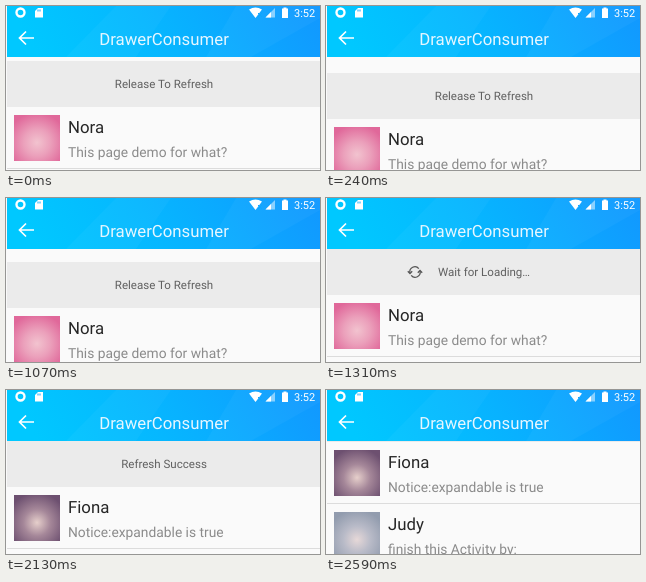
Write an HTML page that moves like this. It is 314x164 px and loops after 2690 ms.

```html
<!DOCTYPE html>
<html lang="en">
<head>
<meta charset="utf-8">
<title>Pull to refresh</title>
<style>
html, body { margin: 0; width: 100%; height: 100%; overflow: hidden; background: #fafafa; }
svg { display: block; width: 314px; height: 164px; }
text { font-family: Roboto, sans-serif; text-rendering: geometricPrecision; }
.name { font-size: 16.8px; fill: #262626; }
.note { font-size: 13.8px; fill: #8b8b8b; }
.label { font-size: 11.55px; fill: #606060; text-anchor: middle; }
.title { font-size: 16.8px; fill: #e6f6ff; text-anchor: middle; }
.clock { font-size: 11px; fill: #fff; }
</style>
</head>
<body>
<svg viewBox="0 0 314 164">
  <defs>
    <linearGradient id="sky" x2="1" y2="-.1">
      <stop stop-color="#00c8ff"/>
      <stop offset=".4" stop-color="#06b7ff"/>
      <stop offset=".72" stop-color="#0ca6ff"/>
      <stop offset="1" stop-color="#1297ff"/>
    </linearGradient>
    <radialGradient id="pink" cy=".6" r=".65">
      <stop stop-color="#f2c3cf"/><stop offset=".45" stop-color="#eba0bb"/><stop offset="1" stop-color="#e0689a"/>
    </radialGradient>
    <radialGradient id="plum" cy=".6" r=".65">
      <stop stop-color="#e6cfcb"/><stop offset=".45" stop-color="#a58799"/><stop offset="1" stop-color="#6d5070"/>
    </radialGradient>
    <radialGradient id="silver" cy=".6" r=".65">
      <stop stop-color="#e6d8d8"/><stop offset=".45" stop-color="#b9bbc8"/><stop offset="1" stop-color="#929cae"/>
    </radialGradient>
  </defs>

  <rect width="314" height="164" fill="#fafafa"/>
  <g id="list">
    <rect x="1" width="313" height="46" fill="#ebebeb"/>
    <text id="label" class="label" x="158" y="27"></text>
    <g id="spinner" fill="none" stroke="#555" stroke-width="1.3">
      <path d="M-5 1A5 5 0 0 1 3.8-3.3M5-1A5 5 0 0 1-3.8 3.3"/>
      <path d="M-7.2-.8-5 1.6-2.8-.8M7.2.8 5-1.6 2.8.8"/>
    </g>
    <g id="rows"></g>
  </g>

  <rect x="1" width="313" height="51" fill="url(#sky)"/>
  <path d="M60 51 110 0h55L130 51M200 51 230 0h84v12L245 51" fill="#fff" opacity=".03"/>
  <g fill="#fff">
    <circle cx="14.500" cy="6.500" r="4" fill="none" stroke="#fff" stroke-width="2.400"/>
    <path d="M32 2h5v9.500h-8V5zM243 3.500q6.500-4 13 0L249.500 12zM277.500 1.500h3v1h1.500v9.500h-6V2.500h1.500z"/>
    <path d="M269 2v9.500h-9.500z" opacity=".5"/>
    <path d="M265 6v5.500h-5.500z"/>
    <path d="M32 3.500v2M34 3.500v2M252 7l4 4M256 7l-4 4" stroke="#0ca6ff"/>
  </g>
  <text class="clock" x="288" y="10.500">3:52</text>
  <path d="M28 32H13.500M20 25.500 13.500 32l6.500 6.500" fill="none" stroke="#fff" stroke-width="1.700"/>
  <text class="title" x="158" y="38.500">DrawerConsumer</text>
</svg>
<script>
const LOOP = 2690;
const el = id => document.getElementById(id);

// [start ms, top of the refresh band]
const positions = [
  [0, 55], [120, 61], [240, 67], [350, 71], [470, 74],
  [1070, 64], [1190, 57], [1310, 51], [2370, 50], [2590, 6]
];
const labels = [[0, "Release To Refresh"], [1310, "Wait for Loading…"], [2130, "Refresh Success"]];
const turns = [[0, 0], [1430, 45], [1550, 90], [1660, 135], [1780, 180]];

const at = (steps, t) => steps.findLast(([start]) => start <= t)[1];

const row = ([name, note, fill], i) => `<g transform="translate(0 ${46 + 62 * i})">
  <rect x="8" y="8" width="46" height="46" fill="url(#${fill})"/>
  <text class="name" x="62" y="26">${name}</text>
  <text class="note" x="62" y="50">${note}</text>
  <rect x="1" y="61" width="313" height="1" fill="#dcdcdc"/></g>`;
const before = [["Nora", "This page demo for what?", "pink"]].map(row).join("");
const after = [
  ["Fiona", "Notice:expandable is true", "plum"],
  ["Judy", "finish this Activity by:", "silver"]
].map(row).join("");

let refreshed;
function draw(now) {
  const t = now % LOOP;
  el("list").setAttribute("transform", `translate(0 ${at(positions, t)})`);
  el("label").textContent = at(labels, t);
  el("spinner").setAttribute("transform", `translate(89 23) rotate(${at(turns, t)})`);
  el("spinner").setAttribute("visibility", t >= 1310 && t < 2130 ? "visible" : "hidden");
  if (refreshed !== t >= 2130) {
    refreshed = t >= 2130;
    el("rows").innerHTML = refreshed ? after : before;
  }
}

const start = performance.now();
function tick() {
  draw(performance.now() - start);
  requestAnimationFrame(tick);
}
tick();
</script>
</body>
</html>
```
